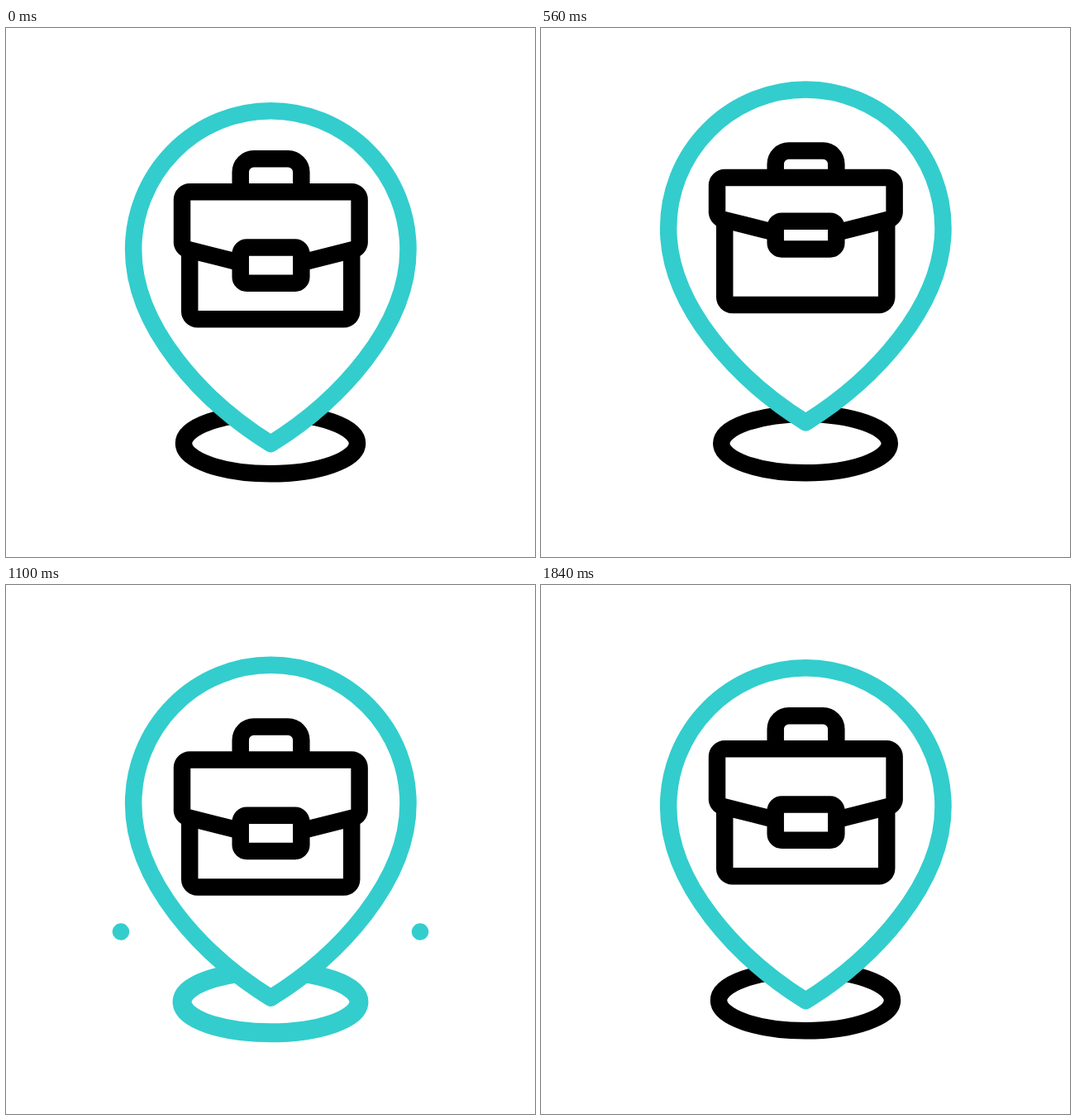
Animation of 640 by 640 pixels, one loop 2.08 s. Source, as an HTML page:

```html
<!DOCTYPE html>
<html lang="en">
<head>
<meta charset="utf-8">
<title>Job location</title>
<style>
  html, body { margin: 0; width: 100%; height: 100%; overflow: hidden; background: #fff; }
  svg { display: block; width: 100vw; height: 100vh; }
  path, line, rect { fill: none; stroke: #000; stroke-width: 20.5; stroke-linejoin: round; }
  .teal { stroke: #33cdcd; }
</style>
</head>
<body>
<svg viewBox="0 0 640 640">
  <path id="ring"/>
  <path id="ringTint" class="teal" style="stroke-width:23" pathLength="1"/>
  <line id="splashLeft" class="teal" stroke-linecap="round"/>
  <line id="splashRight" class="teal" stroke-linecap="round"/>
  <path id="pin" class="teal" style="fill:#fff"
    d="M320.3 503C238 452 154.1 362 154.1 268A166.2 167.7 0 0 1 486.5 268C486.5 362 402.6 452 320.3 503Z"/>
  <g id="bag">
    <path id="body"/>
    <path id="flap"/>
    <path id="handle"/>
    <rect id="clasp" x="283.7" width="73.6" rx="7.5"/>
  </g>
</svg>
<script>
const LOOP = 2080;
const START = 160, SQUAT = 400, PEAK = 720, LAND = 915, REBOUND = 1270, DIP = 1420, REST = 1560;
const el = Object.fromEntries([...document.querySelectorAll('[id]')].map(n => [n.id, n]));

// Eased progress from 0 to 1 between two times.
function ramp(t, from, to) {
  const u = Math.min(1, Math.max(0, (t - from) / (to - from)));
  return u * u * (3 - 2 * u);
}

// One jump: offsets from rest at the squat, peak, landing, rebound and last dip.
// The pin reaches its peak and landing a little before the other parts.
function jump(t, offsets, peak = PEAK, land = LAND, rebound = REBOUND) {
  const times = [START, SQUAT, peak, land, rebound, DIP, REST];
  const values = [0, ...offsets, 0];
  return values.slice(1).reduce(
    (sum, v, i) => sum + (v - values[i]) * ramp(t, times[i], times[i + 1]), 0);
}

const draw = (node, d) => node.setAttribute('d', d);
const shift = (node, y) => node.setAttribute('transform', `translate(0 ${y})`);
const show = (node, on) => node.setAttribute('visibility', on ? 'visible' : 'hidden');

function drawRing(t) {
  const size = 1 + jump(t, [0.121, -0.18, 0.094, -0.047, 0.062]);
  const cy = 502.5 + jump(t, [14, -13.5, 11.5, -6.5, 2.4]);
  const rx = 105 * size, ry = rx * 0.35;
  const arc = `A${rx} ${ry} 0 0 1 320`;
  const d = `M320 ${cy - ry}${arc} ${cy + ry}${arc} ${cy - ry}Z`;
  const part = ramp(t, 860, 1060) - ramp(t, 1430, 1930);
  draw(el.ring, d);
  draw(el.ringTint, d);
  el.ringTint.setAttribute('stroke-dasharray', part < 1 ? `${part} 2` : 'none');
  show(el.ringTint, part > 0);
}

function drawSplash(t) {
  const tail = ramp(t, 970, 1095);
  const head = Math.max(ramp(t, 880, 1010), tail + 0.001);
  for (const [node, side] of [[el.splashLeft, -1], [el.splashRight, 1]]) {
    [tail, head].forEach((u, i) => {
      node.setAttribute('x' + (i + 1), 320 + side * (142 + 39 * u));
      node.setAttribute('y' + (i + 1), 452 - 32.5 * u);
    });
    show(node, t >= 890 && t < 1125);
  }
}

function drawBag(t) {
  shift(el.bag, jump(t, [38.5, -72, 39, -9, 1.6]));

  // The flap folds up on the way to the peak and opens again on the way down.
  const fold = 0.43 * (ramp(t, SQUAT, PEAK) - ramp(t, PEAK, LAND));
  const lift = 88 * fold, top = 198.2, r = 9.5;
  const hinge = 268 - lift, corner = 258 - lift, tip = 284 - lift;
  const turn = `A${r} ${r} 0 0`;
  draw(el.body, `M222.2 ${hinge}V${352.3 - r}${turn} 0 ${222.2 + r} 352.3
    H${418.2 - r}${turn} 0 418.2 ${352.3 - r}V${hinge}`);
  draw(el.flap, `M283.7 ${tip}L220 ${hinge}${turn} 1 213 ${corner}V${top + r}${turn} 1 ${213 + r} ${top}
    H${427.6 - r}${turn} 1 427.6 ${top + r}V${corner}${turn} 1 420.6 ${hinge}L357.3 ${tip}`);

  const grip = top - 39.9 * (1 - 0.87 * fold), bend = 16;
  draw(el.handle, `M283.7 ${top}V${grip + bend}a${bend} ${bend} 0 0 1 ${bend} ${-bend}
    H${357.3 - bend}a${bend} ${bend} 0 0 1 ${bend} ${bend}V${top}`);

  el.clasp.setAttribute('y', top + 67.3 * (1 - fold));
  el.clasp.setAttribute('height', 43.2 * (1 - fold));
}

function render(t) {
  drawRing(t);
  drawSplash(t);
  shift(el.pin, jump(t, [13.5, -60, 17, -19, 9.5], 708, 862, 1300));
  drawBag(t);
}

const start = performance.now();
function tick() {
  render((performance.now() - start) % LOOP);
  requestAnimationFrame(tick);
}
tick();
</script>
</body>
</html>
```
